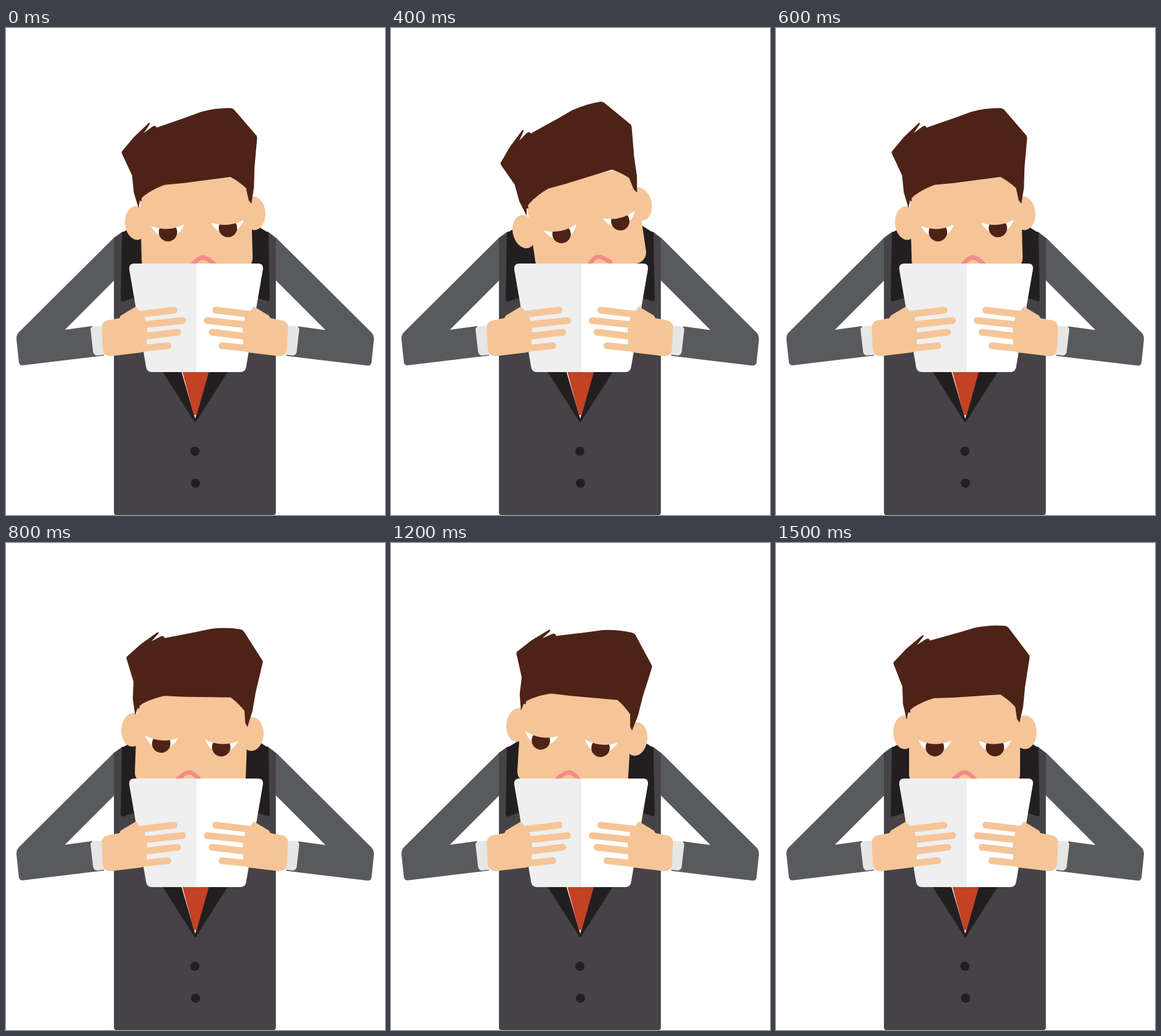
Write an HTML page that moves like this. It is 618 px wide and 794 px high and loops after 1600 ms.

```html
<!DOCTYPE html>
<html lang="en">
<head>
<meta charset="utf-8">
<title>Man reading</title>
<style>
  html, body { margin: 0; width: 100%; height: 100%; overflow: hidden; background: #fff; }
  svg { display: block; width: 100vw; height: 100vh; }
  .skin { fill: #f5c598; }
  .dark { fill: #231f20; }
  .hair { fill: #4e2317; }
  .fingers { fill: none; stroke: #f5c598; stroke-width: 11; stroke-linecap: round; }
</style>
</head>
<body>
<svg viewBox="0 0 618 794">
  <defs>
    <g id="arm">
      <path fill="#595a5d" d="M177 341L21 496Q17 500 17 507L21 545Q22 550 27 550L160 534L155 500L140 486L96 492L177 411Z"/>
    </g>
    <g id="hand">
      <path fill="#e6e6e6" d="M142 487Q151 484 160 487L165 532L148 534Q143 533 142 528L138 493Q137 488 142 487Z"/>
      <path class="skin" d="M156 489Q156 480 164 477L185 473L187 469L212 454L218 462L226 472L230 490L229 526L221 529L171 535Q160 535 158 525Z"/>
      <path class="fingers" d="M216 467L274 460M222 484L288 477M222 503L280 496M215 523L264 518"/>
    </g>
    <g id="eye">
      <path fill="#fff" d="M232 321Q259 334 286 322C276 348 243 348 232 321Z"/>
      <circle class="hair" cx="259" cy="333" r="15"/>
      <path class="skin" d="M232 321Q259 334 286 322V312H232Z"/>
    </g>
  </defs>

  <use href="#arm"/>
  <use href="#arm" transform="translate(617 .5) scale(-1 1)"/>

  <path fill="#454347" d="M176 342L190 332H427L440 342V790Q440 794 436 794H180Q176 794 176 790Z"/>
  <path class="dark" d="M189 334L209 322H409L428 334L430 442Q430 447 425 445L409 440L362 560L311 640Q308.500 645 306 640L255 560L208 440L191 446Q187 446 187 442Z"/>
  <path fill="#fff" d="M286 560H330L308.500 637Z"/>
  <path fill="#c34124" d="M287.500 560H331L311 631H306.500Z"/>
  <circle class="dark" cx="308" cy="690" r="7.500"/>
  <circle class="dark" cx="309" cy="742" r="7.500"/>

  <ellipse id="earL" class="skin" cx="210" cy="308.500" rx="19" ry="27.500"/>
  <ellipse id="earR" class="skin" cx="406" cy="308.500" rx="19" ry="27.500"/>
  <rect id="face" class="skin" x="217" y="240" width="181" height="155" rx="18"/>
  <g id="eyes">
    <use href="#eye"/>
    <use href="#eye" transform="translate(616 0) scale(-1 1)"/>
  </g>
  <path id="mouth" fill="none" stroke="#f48a8a" stroke-width="7" d="M286 389Q300 374 307 374Q314 374 328 389"/>
  <path id="hair" class="hair" d="M192 194L213 172L238 151Q242 149 240 153L230 166L244 157Q250 154 251 159L298 146L325 138Q350 133 373 135Q376 135 379 138L413 183Q414 186 413 190L406 235L403 267L397 293L393 287L390 267Q380 256 366 247L290 252L258 253Q240 258 224 268L219 272L219 277L216 276L213 288L207 262L206 234L192 198Q191 196 192 194Z"/>

  <path fill="#efefef" d="M209 384H310V561H238Q230 561 228.500 553L201 394Q200 384 209 384Z"/>
  <path fill="#fff" d="M309.500 384H411Q420 384 419 393L391.500 553Q390 561 382 561H309.500Z"/>
  <path stroke="#e4e4e4" d="M309.500 384V561"/>
  <use href="#hand"/>
  <use href="#hand" transform="translate(616 0) scale(-1 1)"/>
</svg>
<script>
const LOOP = 1600, STEP = 100;

// Tilt from far left (0) through upright (2) to far right (4), one value per step.
const swing = [-0.1, 0, 0.45, 1, 2, 3, 3.6, 4, 4.3];
const tilt = [-12.3, -4, 0, 3.5, 7];

// Pivot, then shift in x, shift in y and turn at each of the five tilts.
const parts = {
  earL:  { at: [210, 308.5], x: [7.5, 3, 0, -3, -3], y: [23.5, 9.5, 0, -4, -12], r: tilt },
  earR:  { at: [406, 308.5], x: [0, -2, 0, -5, -7], y: [-21.5, -6.5, 0, 3, 11], r: tilt },
  face:  { at: [307.5, 350], x: [14.8, 3.5, 0, -6, -9.5], y: [0, 0, 0, 0, 0], r: [-8.5, -1.5, 0, 2, 3.5] },
  eyes:  { at: [308, 333], x: [18, 5, 0, -6, -15], y: [-7.5, -3.5, 0, -3, -5], r: tilt },
  mouth: { at: [307, 377], x: [30, 13.5, 0, -8, -16], y: [-1, 0, 0, 0, 0], r: tilt },
  hair:  { at: [303, 191], x: [-17, -3.5, 0, 5, 12.5], y: [0, 0, 0, 0, 0], r: [-13.5, -3.8, 0, 4.5, 8.7] }
};
for (const id in parts) parts[id].el = document.getElementById(id);

function mix(list, pos) {
  const i = Math.max(0, Math.min(list.length - 2, Math.floor(pos)));
  return list[i] + (list[i + 1] - list[i]) * (pos - i);
}

function draw(ms) {
  const step = Math.floor((ms % LOOP) / STEP);
  const away = Math.abs(step - 3);
  const pos = swing[Math.min(away, 16 - away)];
  for (const { el, at, x, y, r } of Object.values(parts)) {
    el.setAttribute("transform",
      `translate(${mix(x, pos)} ${mix(y, pos)}) rotate(${mix(r, pos)} ${at[0]} ${at[1]})`);
  }
}

const start = performance.now();
function tick() {
  draw(performance.now() - start);
  requestAnimationFrame(tick);
}
tick();
</script>
</body>
</html>
```
